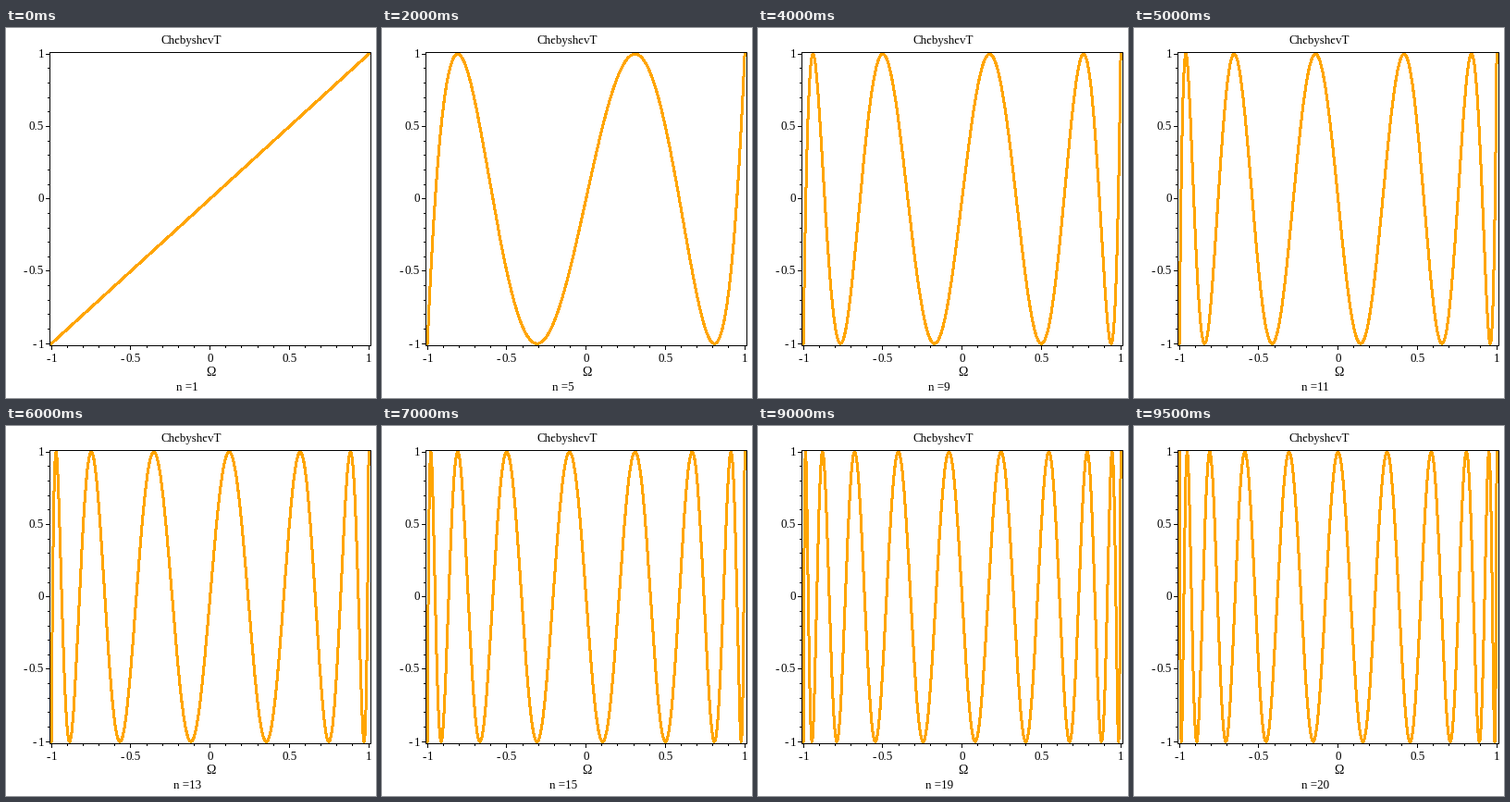
A matplotlib script that plays this animation: 400 by 400 pixels, repeating every 10000 ms.

```python
import numpy as np
import matplotlib.pyplot as plt
from matplotlib.animation import FuncAnimation

SIZE, DPI = 400, 100
PX = 72 / DPI  # points per pixel
LEFT, RIGHT, TOP, BOTTOM = 47.5, 394.5, 26.5, 343.5
FRAMES, INTERVAL = 20, 500

plt.rcParams.update({
    "font.family": "Liberation Serif",
    "font.size": 13 * PX,
    "text.hinting": "native",
})

fig = plt.figure(figsize=(SIZE / DPI, SIZE / DPI), dpi=DPI, facecolor="white")
ax = fig.add_axes([0, 0, 1, 1])
ax.set_xlim(0, SIZE)
ax.set_ylim(SIZE, 0)
ax.axis("off")


def to_x(value):
    return 220.6 + 171.5 * value


def to_y(value):
    return 184.7 - 156.5 * value


def stroke(xs, ys):
    ax.plot(xs, ys, color="black", lw=PX, snap=False,
            solid_capstyle="projecting", solid_joinstyle="miter")


def label(x, baseline, text, ha="center", size=13):
    return ax.text(x, baseline, text, ha=ha, va="baseline",
                   color="black", fontsize=size * PX)


def number(right, baseline, value):
    text = f"{abs(value):g}"
    label(right, baseline, text, "right")
    if value < 0:
        width = 16 if "." in text else 6
        label(right - width - 2, baseline, "-", "right")


stroke([LEFT, RIGHT, RIGHT, LEFT, LEFT], [TOP, TOP, BOTTOM, BOTTOM, TOP])
for step in range(-10, 11):
    value = step / 10
    length = 4 if step % 5 == 0 else 2
    x = np.floor(to_x(value)) + 0.5
    y = np.floor(to_y(value)) + 0.5
    stroke([x, x], [BOTTOM, BOTTOM + length])
    stroke([LEFT - length, LEFT], [y, y])
    if step % 5 == 0:
        half = 8 if step % 2 else 3
        shift = 3 if value < 0 else 0
        number(x + half + shift, 361, value)
        number(41, y + 4, value)

label(200, 17, "ChebyshevT")
label(221, 376, "Ω", size=14)
caption = label(196, 392, "")

theta = np.linspace(np.pi, 0, 1200)
# Without antialiasing every touched pixel is filled, so 2 px paints as 3.
curve, = ax.plot([], [], color="orange", lw=2 * PX, antialiased=False,
                 snap=False, solid_capstyle="round",
                 solid_joinstyle="round", zorder=3)


def update(frame):
    degree = frame + 1
    curve.set_data(to_x(np.cos(theta)), to_y(np.cos(degree * theta)))
    caption.set_text(f"n ={degree}")
    return curve, caption


anim = FuncAnimation(fig, update, frames=FRAMES, interval=INTERVAL,
                     repeat=True, repeat_delay=0)
plt.show()
```
